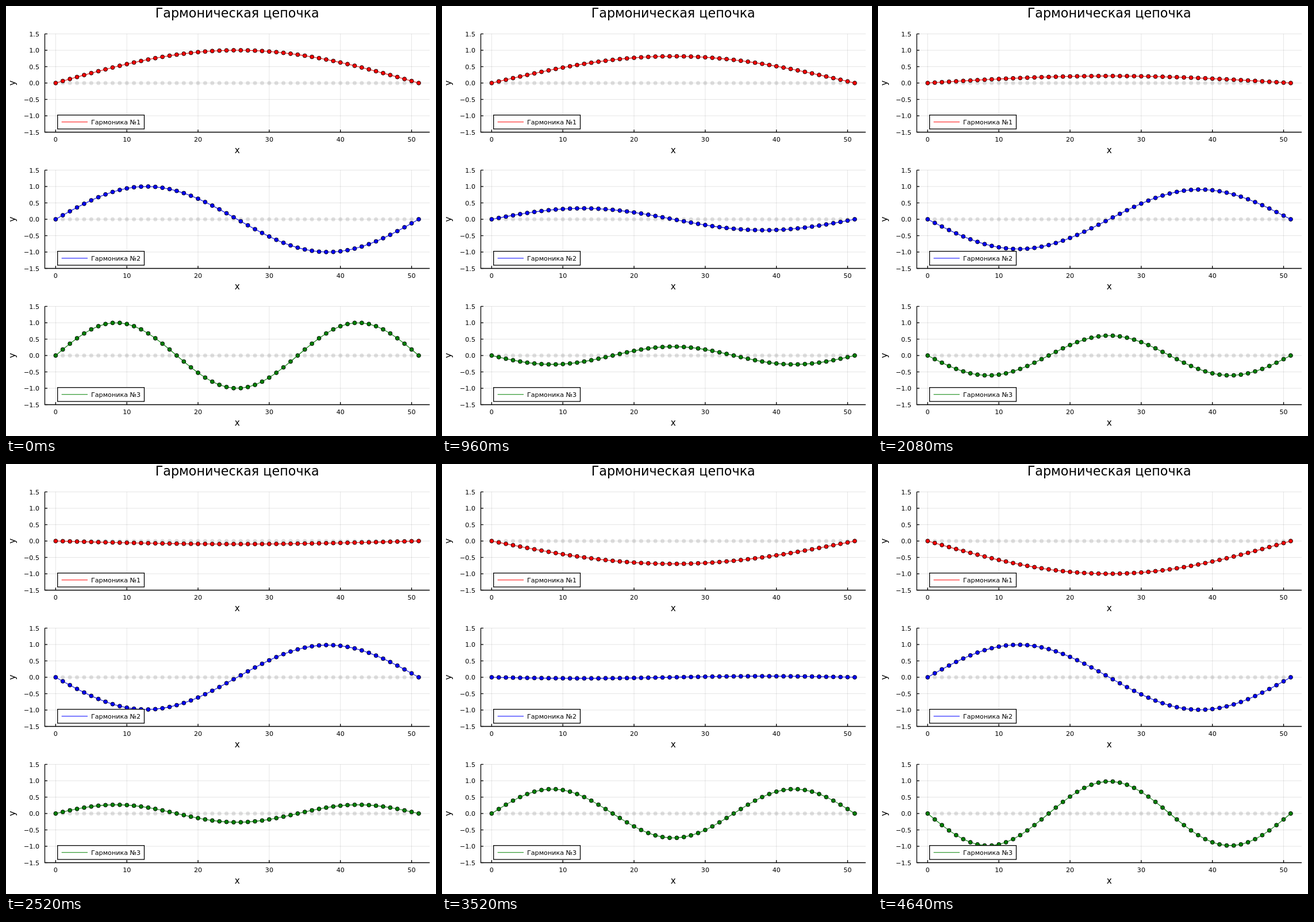
Animation, 748 px wide and 748 px high, one loop 4.66 s. Source, as an HTML page with a canvas:

```html
<!DOCTYPE html>
<html lang="ru">
<head>
<meta charset="utf-8">
<title>Гармоническая цепочка</title>
<style>
  html, body { margin: 0; width: 100%; height: 100%; overflow: hidden; background: #fff; }
  canvas { display: block; }
</style>
</head>
<body>
<canvas id="stage" width="748" height="748"></canvas>
<script>
const ctx = document.getElementById('stage').getContext('2d');

const LOOP = 4660;
const LAST = 51;
const LEFT = 67.5, RIGHT = 737;
const UNIT = 57, HALF = 1.5 * UNIT;
const PANEL_STEP = 237, FIRST_ZERO = 134;
const COLORS = ['#ff0000', '#0000ff', '#008000'];

const px = i => 86.4 + i * 12.383;

function line(x1, y1, x2, y2) {
  ctx.beginPath();
  ctx.moveTo(x1, y1);
  ctx.lineTo(x2, y2);
  ctx.stroke();
}

function stroke(color, width) {
  ctx.strokeStyle = color;
  ctx.lineWidth = width;
}

function text(str, x, y, size, align = 'center') {
  ctx.font = `${size}px "DejaVu Sans", sans-serif`;
  ctx.textAlign = align;
  ctx.fillStyle = '#000';
  ctx.fillText(str, x, y);
}

function dot(x, y, r) {
  ctx.beginPath();
  ctx.arc(x, y, r, 0, 2 * Math.PI);
  ctx.fill();
}

function drawAxes(zero) {
  const top = zero - HALF, bottom = zero + HALF;

  stroke('rgba(0,0,0,0.1)', 1);
  for (let v = 0; v <= 50; v += 10) line(px(v), top, px(v), bottom);
  for (let v = -1.5; v <= 1.5; v += 0.5) line(LEFT, zero - v * UNIT, RIGHT, zero - v * UNIT);

  stroke('#000', 1.3);
  line(LEFT, top, LEFT, bottom + 0.6);
  line(LEFT, bottom, RIGHT, bottom);
  for (let v = 0; v <= 50; v += 10) {
    line(px(v), bottom, px(v), bottom - 4.5);
    text(String(v), px(v), bottom + 16.3, 11.15);
  }
  for (let v = -1.5; v <= 1.5; v += 0.5) {
    const y = zero - v * UNIT;
    line(LEFT, y, LEFT + 4.5, y);
    text(v.toFixed(1).replace('-', '−'), 58, y + 4.1, 11.15, 'right');
  }

  text('x', 402.2, bottom + 36.5, 15.35);
  ctx.save();
  ctx.translate(16.3, zero);
  ctx.rotate(-Math.PI / 2);
  text('y', 0, 0, 15.35);
  ctx.restore();
}

function drawChain(zero, mode, color, step) {
  ctx.fillStyle = 'rgba(128,128,128,0.25)';
  for (let i = 0; i <= LAST; i++) dot(px(i), zero, 3.5);

  // Fixed-end chain: frequency 2 sin(pi n / 2N), half a time unit per step.
  const amp = Math.cos(step * Math.sin(Math.PI * mode / (2 * LAST)));
  const py = i => zero - UNIT * amp * Math.sin(Math.PI * mode * i / LAST);

  stroke(color, 1.1);
  ctx.beginPath();
  for (let i = 0; i <= LAST; i++) ctx.lineTo(px(i), py(i));
  ctx.stroke();

  stroke('#000', 0.9);
  ctx.fillStyle = color;
  for (let i = 0; i <= LAST; i++) {
    dot(px(i), py(i), 3.45);
    ctx.stroke();
  }
}

function drawLegend(zero, mode, color) {
  ctx.fillStyle = '#fff';
  ctx.fillRect(89.7, zero + 55.7, 150.8, 24.2);
  stroke('#000', 1.3);
  ctx.strokeRect(89.7, zero + 55.7, 150.8, 24.2);
  stroke(color, 1.1);
  line(96.7, zero + 67.8, 142, zero + 67.8);
  text('Гармоника №' + mode, 148, zero + 71.9, 11.15, 'left');
}

// Steps last 20, 100 and 20 ms in turn.
function stepAt(ms) {
  const rest = ms % 140;
  return 3 * Math.floor(ms / 140) + (rest < 20 ? 0 : rest < 120 ? 1 : 2);
}

function draw(step) {
  ctx.fillStyle = '#fff';
  ctx.fillRect(0, 0, 748, 748);
  text('Гармоническая цепочка', 402.2, 19.5, 22.3);
  COLORS.forEach((color, n) => {
    const zero = FIRST_ZERO + n * PANEL_STEP;
    drawAxes(zero);
    drawChain(zero, n + 1, color, step);
    drawLegend(zero, n + 1, color);
  });
}

let start = null;
function tick(now) {
  if (start === null) start = now;
  draw(stepAt(Math.max(0, now - start) % LOOP));
  requestAnimationFrame(tick);
}
draw(0);
requestAnimationFrame(tick);
</script>
</body>
</html>
```
